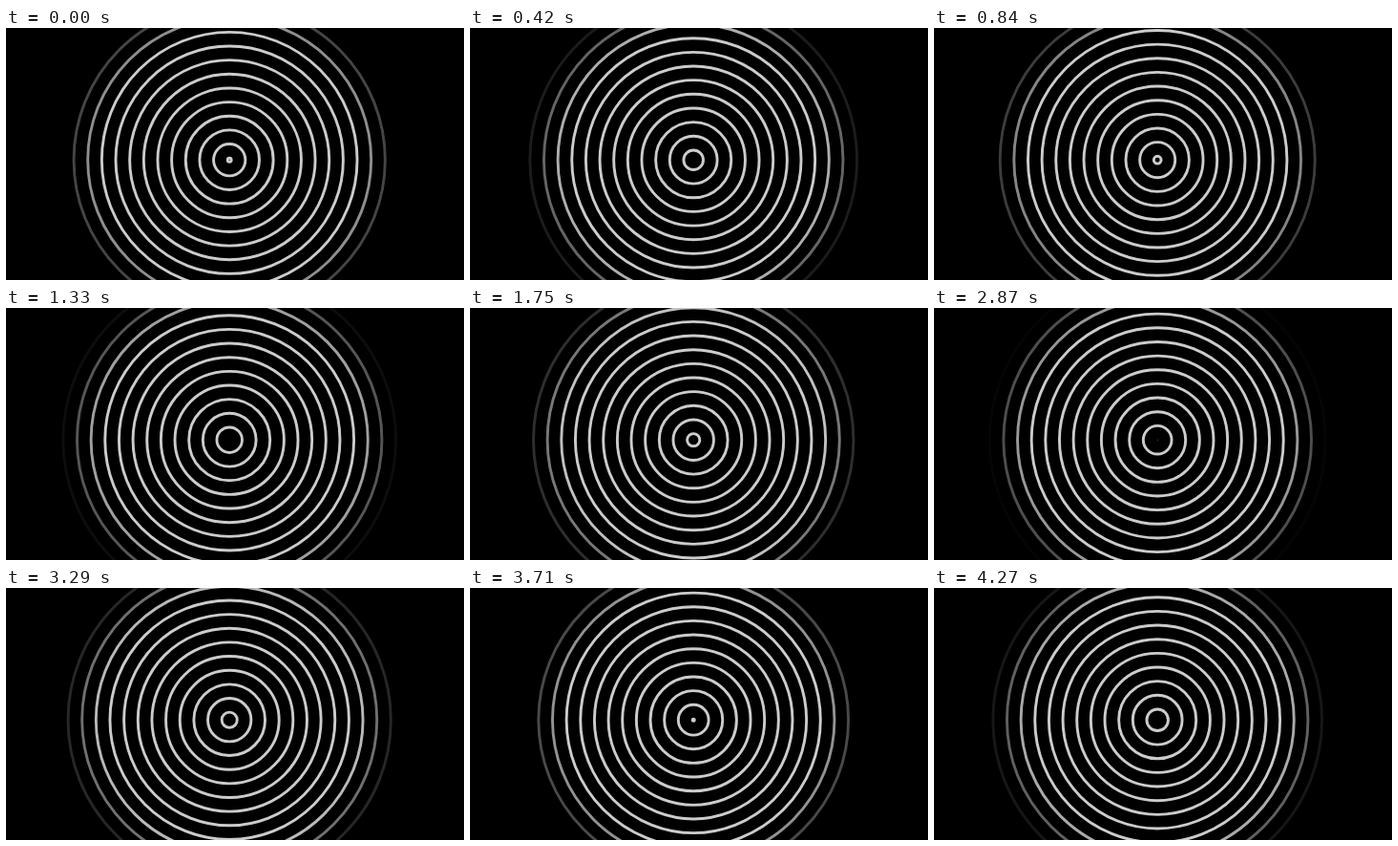
Recreate the animation shown at these times as an HTML page. Size 480 by 264 pixels, loop 4.34 s.

```html
<!DOCTYPE html>
<html lang="en">
<head>
<meta charset="utf-8">
<title>Ripples</title>
<style>
  html, body { margin: 0; width: 100%; height: 100%; overflow: hidden; background: #000; }
  svg { display: block; width: 100vw; height: 100vh; }
</style>
</head>
<body>
<svg viewBox="0 0 480 264"><g id="rings" fill="none"></g></svg>
<script>
const LOOP = 4340, STEP = 70;
const SPACING = 14.65, START = 2, COUNT = 13;
const FADE_END = 177, FADE_RATE = 5, BRIGHTEST = 204, LINE = 2.9;

// Outward travel in px at a given step; the pace wavers slightly.
const TRAVEL = [[0, 0], [12, 16.55], [25, 33.9], [36, 48.5], [41, 56.8], [53, 72.5], [61, 82.5]];

const group = document.getElementById('rings');
const rings = Array.from({ length: COUNT }, () => {
  const ring = document.createElementNS('http://www.w3.org/2000/svg', 'circle');
  ring.setAttribute('cx', 234.2);
  ring.setAttribute('cy', 138.2);
  return group.appendChild(ring);
});

function travelAt(step) {
  const next = Math.max(1, TRAVEL.findIndex(([s]) => s >= step));
  const [s0, d0] = TRAVEL[next - 1];
  const [s1, d1] = TRAVEL[next];
  return d0 + (d1 - d0) * (step - s0) / (s1 - s0);
}

function draw(time) {
  const step = Math.floor((time % LOOP) / STEP);
  const inner = (START + travelAt(step)) % SPACING;
  rings.forEach((ring, i) => {
    const radius = inner + i * SPACING;
    const grey = Math.round(Math.max(0, Math.min(BRIGHTEST, (FADE_END - radius) * FADE_RATE)));
    ring.setAttribute('r', radius);
    ring.setAttribute('stroke-width', Math.min(LINE, radius * 2));
    ring.setAttribute('stroke', `rgb(${grey},${grey},${grey})`);
  });
}

const start = performance.now();
function tick() {
  draw(performance.now() - start);
  requestAnimationFrame(tick);
}
tick();
</script>
</body>
</html>
```
